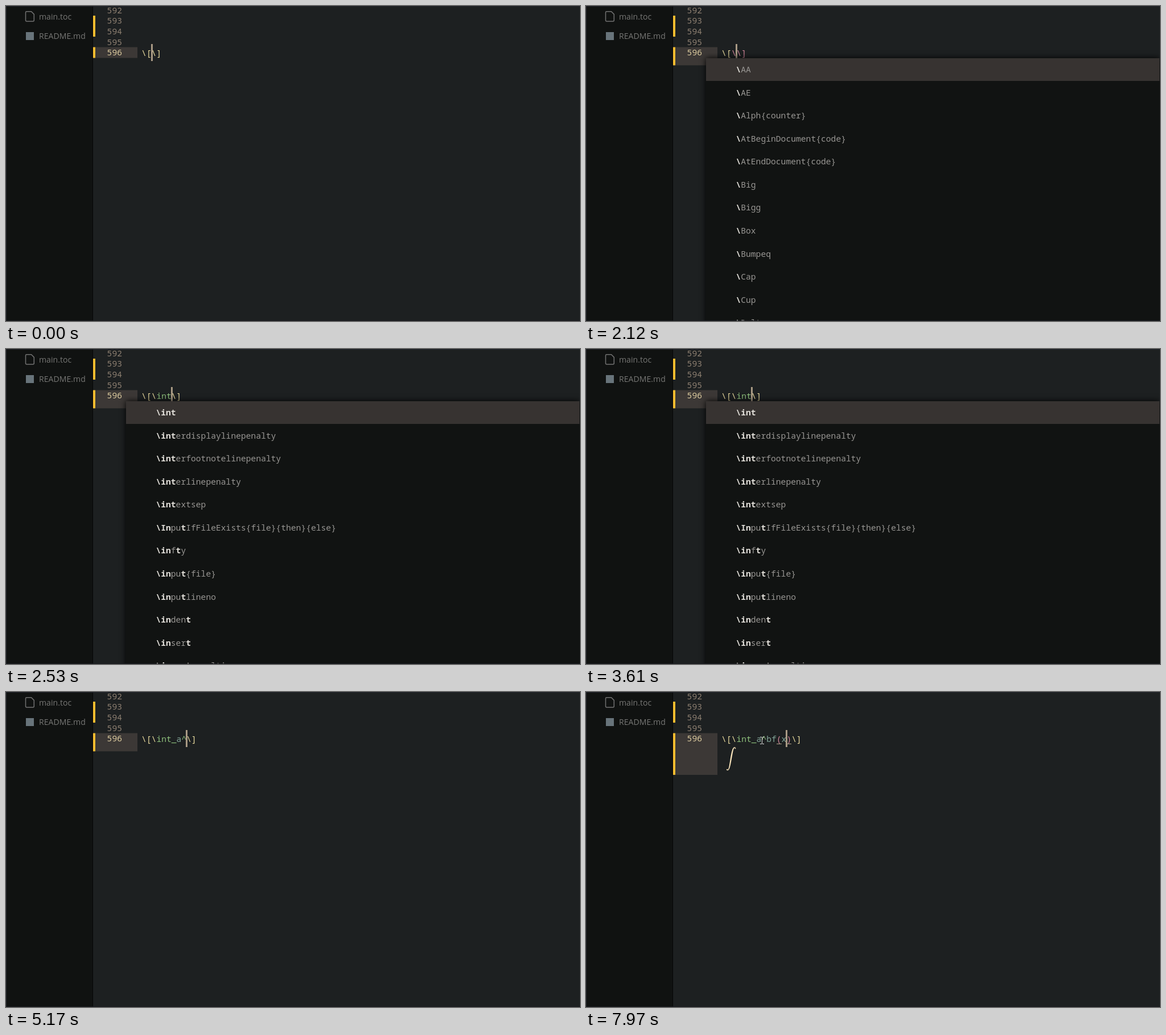
An HTML page with a canvas for the animation above (8000 ms loop, 1009 by 555 pixels).

```html
<!DOCTYPE html>
<html lang="en">
<head>
<meta charset="utf-8">
<title>LaTeX autocomplete</title>
<style>
html, body { margin: 0; width: 100%; height: 100%; overflow: hidden; background: #1d2021; }
canvas { display: block; }
</style>
</head>
<body>
<canvas id="stage" width="1009" height="555"></canvas>
<script>
const ctx = document.getElementById('stage').getContext('2d');
const LOOP = 8000, ADVANCE = 8.8, ROW = 40.53, CODE_X = 238;
const MONO = '14.667px "Noto Sans Mono", monospace';
const UI = '14.1px "Open Sans", "Noto Sans", sans-serif';
const CREAM = '#ebdc9f', GREEN = '#8ec07c', BLUE = '#83a598', PINK = '#d3869b';

// One key press per character, at the matching time.
const KEYS = String.raw`\int_a^bf(x`;
const KEY_TIMES = [2000, 2270, 2410, 2530, 3860, 4110, 5170, 5290, 6610, 7040, 7700];

const words = text => text.split(' ').map(word => '\\' + word);
const SUGGESTIONS = {
  1: words('AA AE Alph{counter} AtBeginDocument{code} AtEndDocument{code} Big Bigg Box Bumpeq Cap Cup Delta'),
  2: words('Im IfFileExists{file}{then}{else} InputIfFileExists{file}{then}{else} include{file} input{file} ' +
    'includegraphics[options]{name} includegraphics{name} includeonly{filelist} indexname{name} indexspace ' +
    'index{entry} inputlineno'),
  3: words('in InputIfFileExists{file}{then}{else} include{file} input{file} includegraphics[options]{name} ' +
    'includegraphics{name} includeonly{filelist} indexname{name} indexspace index{entry} inputlineno indent'),
  4: words('int interdisplaylinepenalty interfootnotelinepenalty interlinepenalty intextsep ' +
    'InputIfFileExists{file}{then}{else} infty input{file} inputlineno indent insert insertpenalties')
};

function rect(x, y, right, bottom, color) {
  ctx.fillStyle = color;
  ctx.fillRect(x, y, right - x, bottom - y);
}

function text(string, x, y, color, font = MONO) {
  ctx.font = font;
  ctx.fillStyle = color;
  ctx.fillText(string, x, y);
}

function drawSidebar() {
  rect(0, 0, 152, 555, '#101211');
  rect(152, 0, 153, 555, '#050606');
  ctx.strokeStyle = '#727272';
  ctx.lineWidth = 1.5;
  ctx.stroke(new Path2D('M36 9.8H44.5L49.3 14.6V25Q49.3 27 47.3 27H36.5Q34.5 27 34.5 25V11.5Q34.5 9.8 36 9.8Z'));
  rect(35, 46, 49, 60, '#68747b');
  text('main.toc', 58, 24, '#777775', UI);
  text('README.md', 58, 58, '#777775', UI);
}

function drawGutter(t) {
  const bottom = t < 690 ? 91.5 : t < 6080 ? 104.5 : 146;
  rect(157, 72.5, 231, bottom, '#3c3836');
  rect(153, 17, 157, 54, '#fabd2f');
  rect(153, 72.5, 157, bottom, '#fabd2f');
  for (let i = 0; i < 5; i++)
    text(592 + i, 177.6, 12.5 + i * 18.7, i < 4 ? '#8d7f71' : '#dccb9f');
}

function codeColor(char, index, line) {
  if (line === '\\[\\\\]') return index < 2 ? CREAM : PINK;
  if ('int_^'.includes(char)) return GREEN;
  if ('abfx'.includes(char)) return BLUE;
  return '()'.includes(char) ? PINK : CREAM;
}

function drawCode(typed) {
  const before = '\\[' + typed;
  const line = before + (typed.includes('(') ? ')' : '') + '\\]';
  [...line].forEach((char, i) => {
    const x = CODE_X + i * ADVANCE;
    text(char, x, 87.5, codeColor(char, i, line));
    if ('()'.includes(char)) rect(Math.round(x), 91, Math.round(x + 9), 92, '#b3a58c');
  });
  const cursor = Math.round(CODE_X - 1 + before.length * ADVANCE);
  rect(cursor, 67, cursor + 3, 97, '#a89984');
}

function drawPopup(query) {
  ctx.save();
  ctx.shadowColor = '#000';
  ctx.shadowBlur = 10;
  rect(211, 92, 1008, 570, '#111312');
  ctx.restore();
  rect(211, 92, 1008, 132, '#373331');
  SUGGESTIONS[query.length].forEach((item, row) => {
    let matched = 0;
    [...item].forEach((char, i) => {
      const hit = matched < query.length && char.toLowerCase() === query[matched];
      if (hit) matched++;
      text(char, 263.4 + i * ADVANCE, 117.3 + row * ROW,
        hit ? '#e3e0da' : '#989693', (hit ? 'bold ' : '') + MONO);
    });
  });
}

function drawIntegral() {
  ctx.fillStyle = '#fbe6bd';
  ctx.fill(new Path2D('M263.3 99.5C262.5 96.8 260 98 258.8 103C256.5 113 255 126 252.8 133' +
    'C251.2 138.8 248 139.6 247 136.5C248.2 138.6 250 137.4 251.2 132.5' +
    'C253 125 254.2 111 256.8 103C258.6 96.3 262.6 95.6 263.3 99.5Z'));
  for (const [x, y] of [[262.4, 99.2], [248, 136.8]]) {
    ctx.beginPath();
    ctx.arc(x, y, 1, 0, 7);
    ctx.fill();
  }
}

function drawArrow() {
  const arrow = new Path2D('M307.5 85.5V101.5L311.2 98L313.6 103.5L316 102.5L313.7 97.2H319Z');
  ctx.fillStyle = '#fff';
  ctx.fill(arrow);
  ctx.strokeStyle = '#000';
  ctx.lineWidth = 1;
  ctx.stroke(arrow);
}

function drawBeam() {
  ctx.strokeStyle = '#e4e4e4';
  ctx.lineWidth = 1;
  ctx.stroke(new Path2D('M306 79.5H309M310 79.5H313M309.5 80V91M306 91.5H309M310 91.5H313'));
}

function draw(t) {
  const typed = KEYS.slice(0, KEY_TIMES.filter(time => time <= t).length);
  rect(0, 0, 1009, 555, '#1d2021');
  drawSidebar();
  drawGutter(t);
  drawCode(typed);
  if (t >= 6080) drawIntegral();
  if (t >= 2120 && t < 3860) drawPopup(typed);
  if (t >= 3220 && t < 3610) drawArrow();
  if (t >= 5290 && t < 6610 || t >= 7970) drawBeam();
  rect(0, 0, 1009, 1, '#20232b');
  rect(0, 0, 1, 555, '#20232b');
  rect(0, 554, 1009, 555, '#191b20');
}

function tick() {
  draw(performance.now() % LOOP);
  requestAnimationFrame(tick);
}
tick();
</script>
</body>
</html>
```
